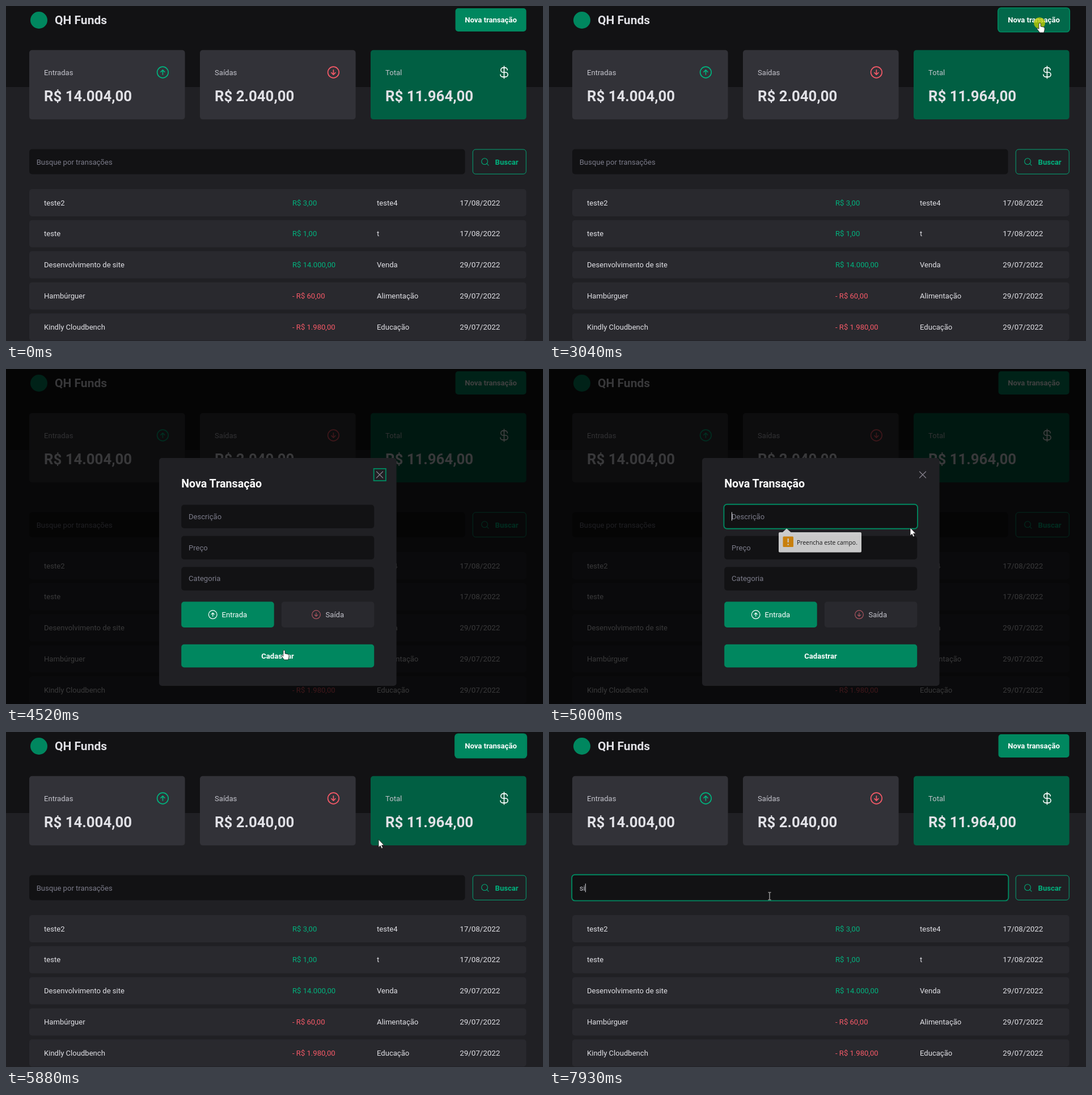
An HTML page that plays this animation: 947 by 591 pixels, repeating every 8000 ms.

```html
<!DOCTYPE html>
<html lang="pt-BR">
<head>
<meta charset="utf-8">
<title>Transações</title>
<style>
html, body { margin: 0; height: 100%; overflow: hidden; background: #202024; }
svg { display: block; width: 100vw; height: 100vh; font: 13.09px Roboto, sans-serif; }
text { fill: #e1e1e6; white-space: pre; }
.bold { font-weight: 700; }
.soft { fill: #c4c4cc; }
.hint { fill: #7c7c8a; }
.in { fill: #00b37e; }
.out { fill: #f75a68; }
.white { fill: #fff; }
.value { font-size: 25.8px; font-weight: 700; }
.title { font-size: 19.64px; font-weight: 700; }
.brand { font-size: 21px; font-weight: 700; }
.date { font-size: 13.35px; }
.bubble { font: 10.4px "Open Sans", sans-serif; fill: #1b1b1b; }
.icon { fill: none; stroke-width: 16; stroke-linecap: round; stroke-linejoin: round; }
</style>
</head>
<body>
<svg id="stage" viewBox="0 0 947 591"></svg>
<script>
const GREEN = '#00875f', MINT = '#00b37e', RED = '#f75a68', BLACK = '#121214';
const LOOP = 8000;

// Markup helpers; baselines snap to whole pixels
const box = (x, y, w, h, fill, more = '') =>
  `<rect x="${x}" y="${y}" width="${w}" height="${h}" rx="5" fill="${fill}" ${more}/>`;
const label = (x, y, str, cls = '', more = '') =>
  `<text x="${x}" y="${Math.round(y)}" class="${cls}" ${more}>${str}</text>`;
const centered = (x, y, str) => label(x, y, str, 'bold white', 'text-anchor="middle"');
const ring = (id, x, y, w, h, rx = 5.5) =>
  `<rect id="${id}" x="${x}" y="${y}" width="${w}" height="${h}" rx="${rx}" fill="none" stroke="${GREEN}" stroke-width="1.9"/>`;
const caret = (id, x, y) => `<rect id="${id}" x="${x}" y="${y}" width="1" height="15" fill="#e1e1e6"/>`;

const GLYPHS = {
  up: '<circle cx="128" cy="128" r="96"/><path d="M94 122l34-34 34 34M128 168V88"/>',
  down: '<circle cx="128" cy="128" r="96"/><path d="M94 134l34 34 34-34M128 88v80"/>',
  dollar: '<path d="M128 24v208M184 88a40 40 0 0 0-40-40h-32a40 40 0 0 0 0 80h40a40 40 0 0 1 0 80h-48a40 40 0 0 1-40-40"/>',
  search: '<circle cx="116" cy="116" r="84"/><path d="M175 175l49 49"/>',
  close: '<path d="M200 56L56 200M200 200L56 56"/>'
};
const icon = (name, cx, cy, size, color) =>
  `<g class="icon" stroke="${color}" transform="translate(${cx - size / 2} ${cy - size / 2}) scale(${size / 256})">${GLYPHS[name]}</g>`;

const card = (x, name, value, fill, glyph, color) =>
  box(x, 77.7, 274.6, 122.4, fill) + label(x + 26, 122, name, 'soft') +
  label(x + 26, 168, value, 'value') + icon(glyph, x + 235.4, 117, 26.18, color);

const row = ([name, price, category, date], i) => {
  const y = 323 + 54.8 * i, base = y + 28.5;
  return box(41, y, 876.5, 48, '#29292e') + label(67, base, name) +
    label(505, base, price, price[0] === '-' ? 'out' : 'in') +
    label(654, base, category) + label(800.3, base, date, 'date');
};

const field = (y, hint) => box(309.2, y, 340, 41.5, BLACK) + label(322, y + 25.2, hint, 'hint');

const page =
  '<rect width="947" height="591" fill="#202024"/>' +
  `<rect width="947" height="143" fill="${BLACK}"/>` +
  `<circle cx="58" cy="25" r="15" fill="${GREEN}"/>` +
  label(86, 32, 'QH Funds', 'brand') +
  box(792.5, 4, 125, 41, GREEN, 'id="newButton"') + ring('newRing', 791.9, 3.4, 126.2, 42.2) +
  centered(855, 29, 'Nova transação') +
  card(41, 'Entradas', 'R$ 14.004,00', '#323238', 'up', MINT) +
  card(342, 'Saídas', 'R$ 2.040,00', '#323238', 'down', RED) +
  card(643, 'Total', 'R$ 11.964,00', '#015f43', 'dollar', '#fff') +
  box(41, 252.6, 768.5, 44.2, BLACK) + ring('searchRing', 40.2, 251.8, 770.1, 45.8) +
  label(53.7, 280, '', '', 'id="query"') + caret('searchCaret', 54, 267.5) +
  box(823.2, 253, 94, 43.4, 'none', `stroke="${MINT}" stroke-width=".9"`) +
  icon('search', 844.8, 275, 16.4, MINT) + label(862.6, 280, 'Buscar', 'bold in') +
  [
    ['teste2', 'R$ 3,00', 'teste4', '17/08/2022'],
    ['teste', 'R$ 1,00', 't', '17/08/2022'],
    ['Desenvolvimento de site', 'R$ 14.000,00', 'Venda', '29/07/2022'],
    ['Hambúrguer', '- R$ 60,00', 'Alimentação', '29/07/2022'],
    ['Kindly Cloudbench', '- R$ 1.980,00', 'Educação', '29/07/2022']
  ].map(row).join('');

const modal = '<g id="modal"><rect width="947" height="591" opacity=".75"/>' +
  box(270, 157, 418.6, 402, '#202024') +
  label(309.2, 209, 'Nova Transação', 'title white') +
  icon('close', 659, 186.5, 19.64, '#85818d') + ring('closeRing', 648.6, 175.9, 21.2, 21.2, 0) +
  field(239.5, 'Descrição') + field(294.4, 'Preço') + field(349.2, 'Categoria') +
  ring('fieldRing', 308.4, 238.7, 341.6, 43.1) + caret('fieldCaret', 322, 252.5) +
  box(309.2, 410.5, 163.5, 45.5, GREEN) + icon('up', 364.7, 433.3, 19.64, '#fff') +
  label(380.5, 438, 'Entrada', 'white') +
  box(485.8, 410.5, 163.5, 45.5, '#29292e') + icon('down', 547, 433.3, 19.64, '#ac5560') +
  label(563.5, 438, 'Saída', 'soft') +
  box(309.2, 485.8, 340, 40.7, GREEN, 'id="saveButton"') + ring('saveRing', 308.4, 485, 341.6, 42.3) +
  centered(479, 511, 'Cadastrar') +
  '<g id="bubble"><path d="M407 288h5l7-6.5 7.5 6.5H549q2 0 2 2v31.5q0 2-2 2H407q-2 0-2-2V290q0-2 2-2Z" fill="#fff"/>' +
  '<rect x="412.5" y="295.5" width="18.5" height="18.5" rx="1.5" fill="#ffa10c"/>' +
  '<path d="M421.7 299v7m0 2.4v2.3" stroke="#fff" stroke-width="2.2"/>' +
  label(437, 310, 'Preencha este campo.', 'bubble') + '</g></g>';

const pointer = '<circle id="press" r="10" fill="#c8d200" opacity=".75"/>' +
  '<g id="cursor" fill="#fff" stroke="#111" stroke-width=".8" stroke-linejoin="round">' +
  '<path id="arrow" d="M0 0V14L3.2 11.2 5.3 16 7.6 15 5.5 10.3H9.8Z"/>' +
  '<path id="hand" d="M-1.6 1.6a1.6 1.6 0 0 1 3.2 0V6l5.4 1.2q1.6.5 1.6 2V12L7.2 17H0L-4.8 10.6q0-1.9 1.8-1.3l1.4 1.3Z"/>' +
  '<path id="beam" d="M-2.5-6.5H-.6L0-6 .6-6.5H2.5M0-6V6M-2.5 6.5H-.6L0 6 .6 6.5H2.5" fill="none" stroke="#d8d8d8" stroke-width="1"/></g>';

document.getElementById('stage').innerHTML = page + modal + pointer;
const ui = Object.fromEntries([...document.querySelectorAll('[id]')].map(el => [el.id, el]));

// Pointer stops: time, x, y
const PATH = [
  [1240, 787, 583], [1305, 787, 583], [1480, 640, 420], [1700, 420, 250], [1850, 300, 218],
  [2000, 236, 245], [2090, 218, 258], [2250, 300, 245], [2500, 640, 165], [2640, 800, 112],
  [2840, 865.5, 30], [3110, 865.5, 30], [3390, 863.5, 30], [3600, 770, 130], [3850, 590, 310],
  [4160, 434, 450], [4300, 450, 478], [4500, 490.5, 496], [4750, 490.5, 496], [4860, 560, 400],
  [4990, 637, 280], [5060, 637, 280], [5220, 655, 225], [5450, 658, 188], [5870, 657, 189.5],
  [5945, 657, 189.5], [6200, 540, 225], [6450, 430, 262], [6660, 391, 277], [6990, 388, 280],
  [7260, 388, 280], [7530, 388.5, 282], [7790, 388.5, 282], [7920, 389, 289.5], [8000, 389, 289.5]
];

const between = (t, from, to) => t >= from && t < to;
const ramp = (t, from, to) => Math.min(1, Math.max(0, (t - from) / (to - from)));
const show = (el, on) => el.setAttribute('visibility', on ? 'inherit' : 'hidden');

function position(t) {
  const next = PATH.findIndex(stop => stop[0] > t);
  if (next < 1) return PATH[0].slice(1);
  const [t0, x0, y0] = PATH[next - 1], [t1, x1, y1] = PATH[next];
  const k = ramp(t, t0, t1);
  return [x0 + (x1 - x0) * k, y0 + (y1 - y0) * k];
}

// Green fading to its hover shade
function tint(el, amount) {
  const mix = (a, b) => Math.round(a + (b - a) * amount);
  el.setAttribute('fill', `rgb(${mix(0, 2)},${mix(135, 104)},${mix(95, 74)})`);
}

function draw(t) {
  const [x, y] = position(t);
  const place = `translate(${x} ${y})`;
  const shape = t >= 6430 ? 'beam'
    : between(t, 2790, 3110) || between(t, 4380, 4770) || between(t, 5420, 5880) ? 'hand' : 'arrow';

  show(ui.cursor, t >= 1240);
  ui.cursor.setAttribute('transform', place);
  for (const name of ['arrow', 'hand', 'beam']) show(ui[name], t >= 1240 && name === shape);
  show(ui.press, between(t, 2900, 3110) || between(t, 4600, 4740) || between(t, 5740, 5880) || between(t, 6720, 6860));
  ui.press.setAttribute('transform', `translate(${x - 0.5} ${y})`);

  tint(ui.newButton, t < 3110 ? ramp(t, 2770, 2960) : 0);
  show(ui.newRing, between(t, 2900, 3110) || between(t, 5880, 6720));

  show(ui.modal, between(t, 3110, 5880));
  show(ui.closeRing, between(t, 3110, 4600) || between(t, 5740, 5880));
  show(ui.saveRing, between(t, 4600, 4740));
  tint(ui.saveButton, ramp(t, 4570, 4740) - ramp(t, 4770, 4940));
  show(ui.fieldRing, between(t, 4740, 5740));
  show(ui.fieldCaret, between(t, 4740, 5740) && (t - 4740) % 1000 < 500);
  show(ui.bubble, between(t, 4740, 5740));
  ui.bubble.setAttribute('opacity', t < 5060 ? 0.77 * ramp(t, 4840, 4990) : 0.77 + 0.23 * ramp(t, 5060, 5130));

  const typed = t >= 7860 ? 'si' : t >= 7400 ? 's' : '';
  const lastKey = t >= 7860 ? 7860 : t >= 7400 ? 7400 : 6760;
  ui.query.textContent = typed || 'Busque por transações';
  ui.query.setAttribute('class', typed ? 'soft' : 'hint');
  show(ui.searchRing, t >= 6720);
  show(ui.searchCaret, t >= 6720 && (t - lastKey) % 1000 < 500);
  ui.searchCaret.setAttribute('x', 53.9 + (typed ? ui.query.getComputedTextLength() : 0));
}

const start = performance.now();
function tick() {
  draw((performance.now() - start) % LOOP);
  requestAnimationFrame(tick);
}
tick();
</script>
</body>
</html>
```
